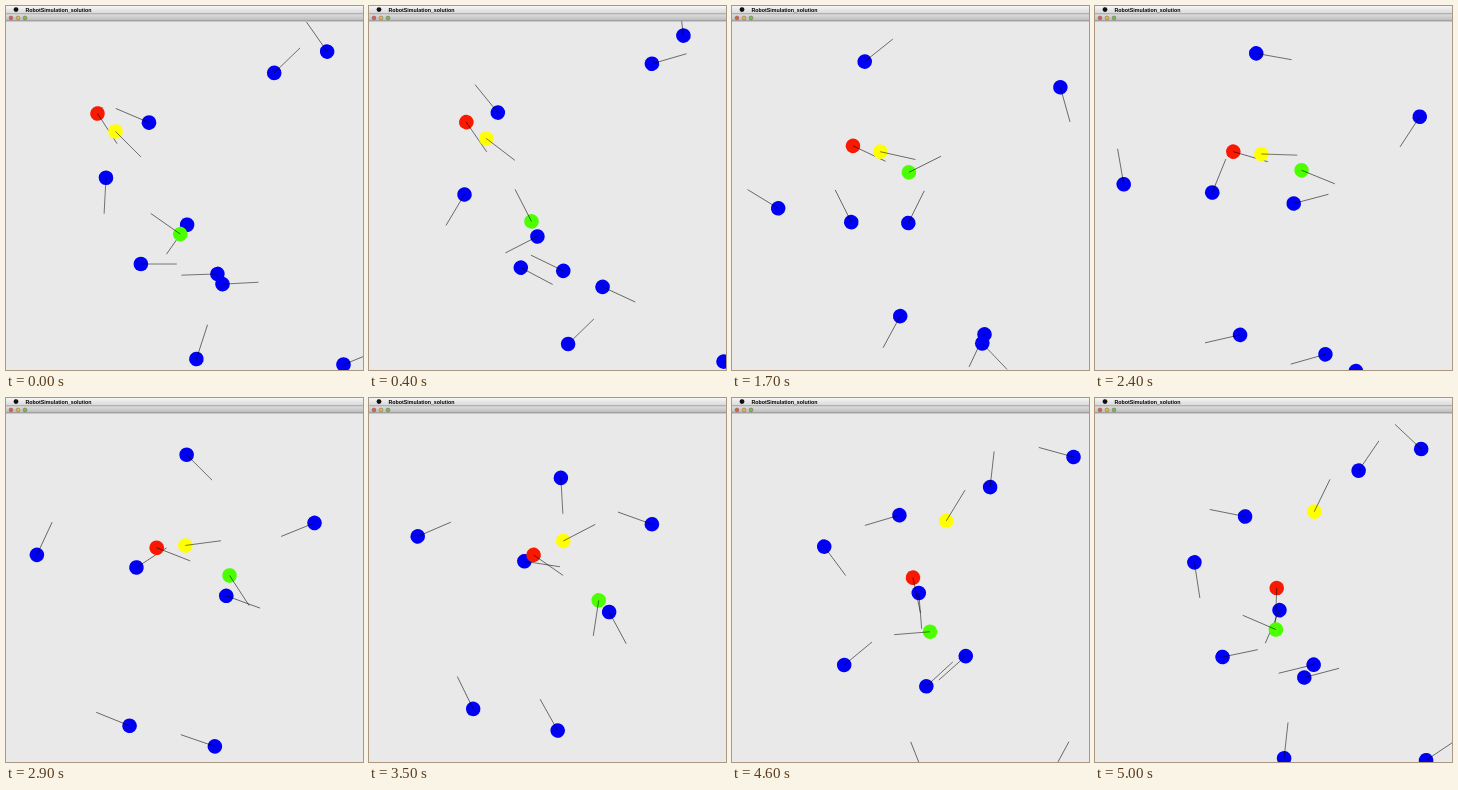
An HTML page for the animation above (5100 ms loop, 357x364 px).

```html
<!DOCTYPE html>
<html lang="en">
<head>
<meta charset="utf-8">
<title>Robot simulation</title>
<style>
  html, body { margin: 0; width: 100%; height: 100%; overflow: hidden; background: #e9e9e9; }
  svg { display: block; width: 357px; height: 364px; }
  text { font: bold 5.3px "Liberation Sans", Arial, sans-serif; }
</style>
</head>
<body>
<svg viewBox="0 0 357 364">
  <defs>
    <linearGradient id="menu" x2="0" y2="1">
      <stop stop-color="#f6f6f6"/><stop offset="1" stop-color="#d6d6d6"/>
    </linearGradient>
    <linearGradient id="bar" x2="0" y2="1">
      <stop stop-color="#e0e0e0"/><stop offset="1" stop-color="#b8b8b8"/>
    </linearGradient>
  </defs>
  <rect width="357" height="364" fill="#e9e9e9"/>
  <g id="robots"></g>
  <rect width="357" height="8" fill="url(#menu)"/>
  <rect y="8" width="357" height="7" fill="url(#bar)"/>
  <rect y="7.5" width="357" height=".7" fill="#8c8c8c"/>
  <rect y="14.6" width="357" height=".7" fill="#7c7c7c"/>
  <circle cx="10" cy="3.6" r="2.4" fill="#111"/>
  <text x="19.5" y="5.6">RobotSimulation_solution</text>
  <g stroke="#555" stroke-width=".4">
    <circle cx="5" cy="11.9" r="1.9" fill="#e8584c"/>
    <circle cx="12" cy="11.9" r="1.9" fill="#ecb440"/>
    <circle cx="19" cy="11.9" r="1.9" fill="#7dbb4a"/>
  </g>
</svg>
<script>
const STEP = 100, STEPS = 51;
const TURN = 6.965, RADIUS = 36, LAG = 1.8, ARM = 36;
const SPEED = 2.61, LEG = 10;
const rad = deg => deg * Math.PI / 180;

// Constant turn rate: the robot runs round a circle
function circling(cx, cy, start) {
  return n => {
    const head = start + n * TURN, a = rad(head - LAG);
    return [cx + RADIUS * Math.sin(a), cy - RADIUS * Math.cos(a), head];
  };
}

// Smooth curve through evenly spaced values
function spline(vals, t) {
  const at = k => vals[Math.max(0, Math.min(vals.length - 1, k))];
  const i = Math.min(Math.floor(t), vals.length - 2), u = t - i;
  const [a, b, c, d] = [at(i - 1), at(i), at(i + 1), at(i + 2)];
  return b + u / 2 * (c - a + u * (2 * a - 5 * b + 4 * c - d + u * (3 * (b - c) + d - a)));
}

// Constant speed along a heading that changes smoothly, one value per leg
function steering(x0, y0, heads) {
  const head = n => spline(heads, n / LEG);
  return n => {
    let x = x0, y = y0;
    for (let i = 0; i < n; i++) {
      const a = rad(head(i + 0.5));
      x += SPEED * Math.cos(a);
      y += SPEED * Math.sin(a);
    }
    return [x, y, head(n)];
  };
}

function add(parent, tag, attrs) {
  const el = document.createElementNS("http://www.w3.org/2000/svg", tag);
  for (const k in attrs) el.setAttribute(k, attrs[k]);
  return parent.appendChild(el);
}

const layer = document.getElementById("robots");
function robot(color, pose) {
  const g = add(layer, "g", {});
  add(g, "circle", { r: 7.3, fill: color });
  add(g, "line", { x2: ARM, stroke: "#000", "stroke-width": 0.5 });
  return { g, pose };
}
const blue = (...circle) => robot("#0000f5", circling(...circle));

const robots = [
  blue(350, 24, 235),
  blue(294, 92, -44),
  blue(156, 83, 203),
  blue(64, 171, 93),
  blue(151, 199, 125),
  blue(136, 294, 0),
  blue(209, 232, 178),
  blue(219.5, 314, -3),
  blue(225, 363, -72),
  blue(352, 391.5, -22),
  robot("#f91800", steering(91.5, 107.5, [57, 49, 18, 23, 51, 92])),
  robot("#4bff00", circling(194, 198, 215)),
  robot("#ffff00", steering(109.5, 125.5, [45, 23, 8, -10, -45, -64]))
];

function draw(ms) {
  const n = Math.floor(ms / STEP) % STEPS;
  for (const { g, pose } of robots) {
    const [x, y, head] = pose(n);
    g.setAttribute("transform", `translate(${x} ${y}) rotate(${head})`);
  }
}

const began = performance.now();
function tick() {
  draw(performance.now() - began);
  requestAnimationFrame(tick);
}
tick();
</script>
</body>
</html>
```
